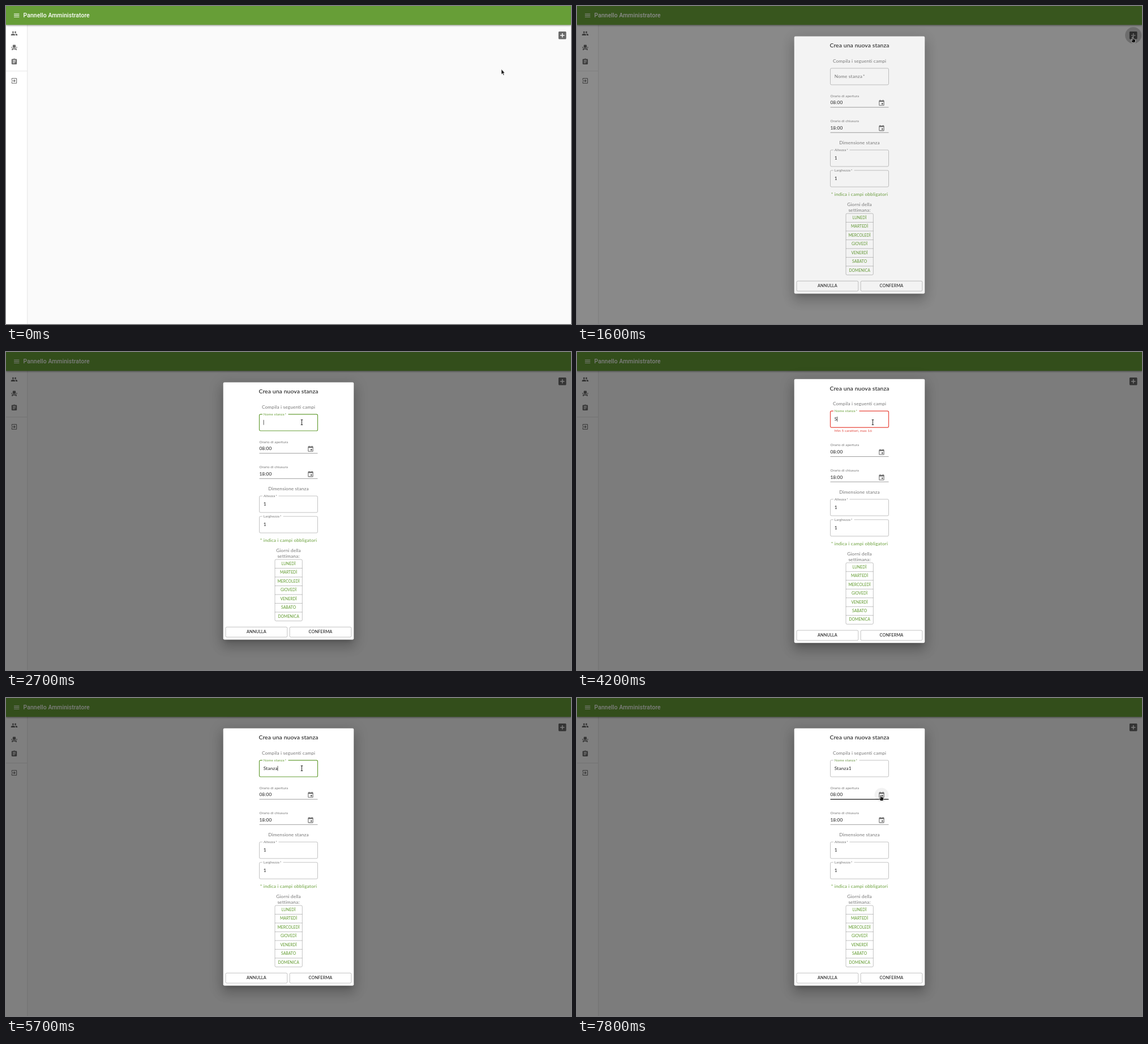
An HTML page for the animation above (8 s loop, 998x561 px).

```html
<!DOCTYPE html>
<html lang="it">
<head>
<meta charset="utf-8">
<title>Pannello Amministratore</title>
<style>
html, body { margin: 0; width: 100%; height: 100%; overflow: hidden; background: #fafafa; }
svg { display: block; width: 998px; height: 561px; }
text { font-family: Lato, "Open Sans", sans-serif; white-space: pre; }
.body { font-size: 8.32px; letter-spacing: .15px; }
.small { font-size: 6.24px; letter-spacing: .11px; }
.mid { text-anchor: middle; }
.grey { fill: #757575; }
.ink { fill: #212121; }
.green { fill: #689f38; }
.line { fill: none; stroke: rgba(0,0,0,.3); stroke-width: .8; }
.icon { fill: rgba(0,0,0,.58); }
</style>
</head>
<body>
<svg id="stage" viewBox="0 0 998 561" xmlns="http://www.w3.org/2000/svg"></svg>
<script>
const ICONS = {
  menu: 'M3 18h18v-2H3v2zm0-5h18v-2H3v2zm0-7v2h18V6H3z',
  group: 'M16 11c1.66 0 2.99-1.34 2.99-3S17.66 5 16 5c-1.66 0-3 1.34-3 3s1.34 3 3 3zm-8 0c1.66 0 2.99-1.34 2.99-3S9.66 5 8 5C6.34 5 5 6.34 5 8s1.34 3 3 3zm0 2c-2.33 0-7 1.17-7 3.5V19h14v-2.5c0-2.33-4.67-3.5-7-3.5zm8 0c-.29 0-.62.02-.97.05 1.16.84 1.97 1.97 1.97 3.45V19h6v-2.5c0-2.33-4.67-3.5-7-3.5z',
  seat: 'M4 18v3h3v-3h10v3h3v-6H4zm15-8h3v3h-3zM2 10h3v3H2zm15 3H7V5c0-1.1.9-2 2-2h6c1.1 0 2 .9 2 2v8z',
  tasks: 'M19 3h-4.18C14.4 1.84 13.3 1 12 1c-1.3 0-2.4.84-2.82 2H5c-1.1 0-2 .9-2 2v14c0 1.1.9 2 2 2h14c1.1 0 2-.9 2-2V5c0-1.1-.9-2-2-2zm-7 0c.55 0 1 .45 1 1s-.45 1-1 1-1-.45-1-1 .45-1 1-1zm2 14H7v-2h7v2zm3-4H7v-2h10v2zm0-4H7V7h10v2z',
  exit: 'M10.09 15.59L11.5 17l5-5-5-5-1.41 1.41L12.67 11H3v2h9.67l-2.58 2.59zM19 3H5c-1.11 0-2 .9-2 2v4h2V5h14v14H5v-4H3v4c0 1.1.89 2 2 2h14c1.1 0 2-.9 2-2V5c0-1.1-.9-2-2-2z',
  add: 'M19 3H5c-1.11 0-2 .9-2 2v14c0 1.1.89 2 2 2h14c1.1 0 2-.9 2-2V5c0-1.1-.9-2-2-2zm-2 10h-4v4h-2v-4H7v-2h4V7h2v4h4v2z',
  event: 'M17 12h-5v5h5v-5zM16 1v2H8V1H6v2H5c-1.11 0-1.99.9-1.99 2L3 19c0 1.1.89 2 2 2h14c1.1 0 2-.9 2-2V5c0-1.1-.9-2-2-2h-1V1h-2zm3 18H5V8h14v11z'
};

const ADD = { x: 982.7, y: 51.7, r: 14.6 };
const DATE = { x: 538, y: 171.1, r: 12.5 };
const DIALOG = { x: 383.7, y: 53.6, w: 230.6, h: 453.8 };
const GROW = 5.8;
const GREY = [117, 117, 117], GREEN = [104, 159, 56], RED = [244, 67, 54];

// Markup helpers
const icon = (name, cx, cy, size = 12.48, cls = 'icon') =>
  `<path class="${cls}" d="${ICONS[name]}" transform="translate(${cx - size / 2} ${cy - size / 2}) scale(${size / 24})"/>`;
const text = (x, y, cls, str, more = '') => `<text x="${x}" y="${y}" class="${cls}" ${more}>${str}</text>`;
const shadow = (b, dy, blur, spread, alpha) =>
  `<rect x="${b.x - spread}" y="${b.y - spread + dy}" width="${b.w + 2 * spread}" height="${b.h + 2 * spread}" opacity="${alpha}" style="filter:blur(${blur}px)"/>`;
const star = '<tspan dx=".13em">*</tspan>';
const outline = (y, from, to) =>
  `M${to} ${y}H548.4a2.1 2.1 0 0 1 2.1 2.1v24.9a2.1 2.1 0 0 1-2.1 2.1H449.6a2.1 2.1 0 0 1-2.1-2.1v-24.9a2.1 2.1 0 0 1 2.1-2.1H${from}`;
const numberField = (y, label, notch) =>
  `<path class="line" d="${outline(y, 453, notch)}"/>` +
  text(454.8, y + 2.2, 'small grey', label + star) + text(454.8, y + 17.4, 'body ink', '1');
const timeField = (y, label, value, id) =>
  text(447.4, y, 'small grey', label) + text(447.4, y + 12.5, 'body ink', value) +
  `<path id="${id}" d="M447.5 ${y + 18}h103" stroke="#000"/>` + icon('event', DATE.x, y + 10.4);
const button = (x, label) =>
  `<rect class="line" x="${x}" y="485.2" width="108.8" height="17.8" rx="2.1"/>` +
  text(x + 54.4, 496.2, 'mid ink', label, 'font-size="7.28" font-weight="500" letter-spacing=".14"');

const days = ['LUNEDÌ', 'MARTEDÌ', 'MERCOLEDÌ', 'GIOVEDÌ', 'VENERDÌ', 'SABATO', 'DOMENICA'];
const dayRow = (day, i) => {
  const y = 366 + 15.48 * i;
  return (i ? `<path class="line" d="M475 ${y}h48.3"/>` : '') +
    text(499.1, y + 9.8, 'mid green', day, 'font-size="6.76" font-weight="500" letter-spacing=".06"');
};

const bar = { x: 0, y: 0, w: 998, h: 33.3 };
document.getElementById('stage').innerHTML = `
<rect width="998" height="561" fill="#fafafa"/>
<rect width="37.5" height="561" fill="#fff"/>
<path d="M37.7 0V561M0 114.8H37.5" stroke="#dcdcdc" stroke-width=".7"/>
${icon('group', 14.5, 48.3)}${icon('seat', 14.5, 73.3)}${icon('tasks', 14.5, 98.2)}${icon('exit', 14.5, 132)}
${shadow(bar, 1, 1, -.5, .2)}${shadow(bar, 2, 1.3, 0, .14)}${shadow(bar, .5, 2.6, 0, .12)}
<rect width="998" height="33.3" fill="#679e37"/>
${icon('menu', 18.7, 16.6, 12.48, '" fill="#fff')}
<text x="30.6" y="20.2" fill="#fff" style="font:500 10.4px Roboto,sans-serif;letter-spacing:.078px">Pannello Amministratore</text>
${icon('add', ADD.x, ADD.y, 18.2)}
<circle id="addHover" cx="${ADD.x}" cy="${ADD.y}" r="${ADD.r}"/>
<circle id="addRipple" cx="${ADD.x}" cy="${ADD.y}"/>
<rect id="backdrop" width="998" height="561"/>
<g id="dialog">
  <g id="shade">${shadow(DIALOG, 5.7, 3.9, -3.6, .2)}${shadow(DIALOG, 12.5, 9.9, 1.6, .14)}${shadow(DIALOG, 4.7, 12, 4.2, .12)}</g>
  <rect id="paper" x="${DIALOG.x}" width="${DIALOG.w}" rx="2.1" fill="#fff"/>
  <g id="upper">
    ${text(499, 73.4, 'mid ink', 'Crea una nuova stanza', 'font-size="10.4" font-weight="500" letter-spacing=".11"')}
    ${text(499, 100, 'mid body grey', 'Compila i seguenti campi')}
    <path id="nameBox" fill="none"/>
    <text id="nameLabel" class="body">Nome stanza${star}</text>
    ${text(454.8, 127.1, 'body ink', '', 'id="nameValue"')}
    <path id="caret" stroke="#111" stroke-width=".7"/>
    ${text(454.8, 147.3, 'small', 'Min 5 caratteri, max 16', 'id="hint" fill="#e0443a"')}
  </g>
  <g id="lower">
    ${timeField(160.7, 'Orario di apertura', '08:00', 'openLine')}
    ${timeField(205.3, 'Orario di chiusura', '18:00', 'closeLine')}
    <circle id="dateHover" cx="${DATE.x}" cy="${DATE.y}" r="${DATE.r}"/>
    ${text(499, 244.2, 'mid body grey', 'Dimensione stanza')}
    ${numberField(254, 'Altezza', 481.5)}
    ${numberField(290, 'Larghezza', 489.5)}
    ${text(499, 335.2, 'mid body green', '* indica i campi obbligatori')}
    ${text(499, 353, 'mid body grey', 'Giorni della')}
    ${text(499, 363.3, 'mid body grey', 'settimana:')}
    <rect class="line" x="475" y="366" width="48.3" height="108.4" rx="2.1"/>
    ${days.map(dayRow).join('')}
    ${button(388, 'ANNULLA')}${button(501.1, 'CONFERMA')}
  </g>
</g>
<g id="cursor" fill="#151515" stroke="#fff" stroke-width=".6" stroke-linejoin="round">
  <path id="arrow" d="M0 0V9.2L2.1 7.3L3.6 10.8L5.1 10.1L3.6 6.7H6.2Z"/>
  <path id="hand" d="M-.8 .6Q0-.5 .8 .6V3.6L2.3 3.8L3.9 4.2L5 5V7.6L4.1 10.3H-.6L-2.7 6.9Q-3-.4+5.4-1.8 5.6L-.8 6.5Z"/>
  <g id="beam"><path d="M-1.8-4.4H1.8M0-4.4V4.4M-1.8 4.4H1.8" stroke-width="1.7"/><path d="M-1.8-4.4H1.8M0-4.4V4.4M-1.8 4.4H1.8" stroke="#151515" stroke-width=".9"/></g>
</g>`;

const el = {};
document.querySelectorAll('[id]').forEach(n => el[n.id] = n);
el.hand.setAttribute('d', 'M-.8 .6Q0-.5 .8 .6V3.6L2.3 3.8L3.9 4.2L5 5V7.6L4.1 10.3H-.6L-2.7 6.9Q-2.8 5.4-1.8 5.6L-.8 6.5Z');
const set = (node, attrs) => { for (const k in attrs) node.setAttribute(k, attrs[k]); };
const show = (node, on) => node.setAttribute('visibility', on ? 'visible' : 'hidden');

// Timing helpers
const clamp = v => Math.max(0, Math.min(1, v));
const lerp = (a, b, p) => a + (b - a) * p;
const bezier = (x1, y1, x2, y2) => x => {
  if (x <= 0 || x >= 1) return clamp(x);
  const at = (a, b, u) => 3 * a * u * (1 - u) ** 2 + 3 * b * u * u * (1 - u) + u ** 3;
  let lo = 0, hi = 1;
  for (let i = 0; i < 24; i++) {
    const u = (lo + hi) / 2;
    if (at(x1, x2, u) < x) lo = u; else hi = u;
  }
  return at(y1, y2, lo);
};
const standard = bezier(.4, 0, .2, 1), easeOut = bezier(0, 0, .2, 1);
const span = (t, start, length, ease = standard) => ease(clamp((t - start) / length));
const within = (t, ...ranges) => ranges.some(([a, b]) => t >= a && t < b);
const near = (p, c) => Math.hypot(p.x - c.x, p.y - c.y) < c.r;

const PATH = [[400, 875, 111.5], [1300, 981.5, 54.5], [1650, 981.5, 54.5], [1900, 640, 141],
  [2000, 640, 141], [2400, 522.5, 124], [6600, 522.5, 124], [7500, 536.5, 171]];
const KEYS = [4200, 4900, 5000, 5100, 5300, 5500, 6500];

function pointer(t) {
  let i = PATH.findIndex(k => t < k[0]);
  if (i < 0) i = PATH.length;
  const a = PATH[Math.max(0, i - 1)], b = PATH[Math.min(i, PATH.length - 1)];
  const u = b[0] > a[0] ? clamp((t - a[0]) / (b[0] - a[0])) : 0, p = u * u * (3 - 2 * u);
  return { x: lerp(a[1], b[1], p), y: lerp(a[2], b[2], p) };
}

function labelColor(t) {
  let c = GREY;
  for (const [start, to] of [[2450, GREEN], [4200, RED], [5300, GREEN], [7750, GREY]])
    c = c.map((v, i) => lerp(v, to[i], span(t, start, 200)));
  return `rgb(${c.map(Math.round)})`;
}

function draw(t) {
  const p = pointer(t);
  const fade = span(t, 1455, 225);
  const error = within(t, [4200, 5300]);
  const focus = within(t, [2450, 7750]);
  const grow = error ? GROW : 0;
  const overName = t > 2000 && p.x > 447 && p.x < 551 && p.y > 109 && p.y < 139;
  const overDate = t > 6700 && p.y > 163 && p.y < 179;
  const onAdd = t < 1650 && near(p, ADD), onDate = near(p, DATE);

  // Add button
  set(el.addHover, { opacity: onAdd ? .04 : 0 });
  set(el.addRipple, {
    r: ADD.r * span(t, 1370, 260, easeOut),
    opacity: .17 * (1 - span(t, 1620, 260)) * (t >= 1400)
  });

  // Dialog
  set(el.backdrop, { opacity: .5 * fade });
  set(el.dialog, { opacity: fade });
  set(el.paper, { y: DIALOG.y - grow, height: DIALOG.h + 2 * grow });
  const mid = DIALOG.y + DIALOG.h / 2, k = 1 + 2 * grow / DIALOG.h;
  set(el.shade, { transform: `translate(0 ${mid * (1 - k)}) scale(1 ${k})` });
  set(el.upper, { transform: `translate(0 ${-grow})` });
  set(el.lower, { transform: `translate(0 ${grow})` });

  // Name field
  const lift = span(t, 2450, 200, easeOut);
  set(el.nameLabel, {
    transform: `translate(454.8 ${lerp(127.1, 111.9, lift)}) scale(${lerp(1, .75, lift)})`,
    fill: labelColor(t)
  });
  set(el.nameBox, {
    d: outline(109.9, 453, lerp(453, 498.5, lift)),
    stroke: error ? '#e8453a' : focus ? '#689f38' : overName ? '#333' : 'rgba(0,0,0,.3)',
    'stroke-width': focus ? 1.2 : .8
  });
  el.nameValue.textContent = 'Stanza1'.slice(0, KEYS.filter(k => t >= k).length);
  const end = 455.1 + (el.nameValue.textContent ? el.nameValue.getComputedTextLength() : 0);
  set(el.caret, { d: `M${end} 119.8v8.8` });
  show(el.caret, within(t, [2500, 3700], [4200, 6200], [6500, 7000], [7500, 7750]));
  show(el.hint, error);

  // Time fields
  const rest = { 'stroke-width': .8, 'stroke-opacity': .48 };
  set(el.openLine, overDate ? { 'stroke-width': 1.2, 'stroke-opacity': .9 } : rest);
  set(el.closeLine, rest);
  set(el.dateHover, { opacity: onDate ? .05 : 0 });

  // Pointer
  const shape = onAdd || onDate || (t < 1700 && near(p, ADD)) ? 'hand' : overName || overDate ? 'beam' : 'arrow';
  for (const s of ['arrow', 'hand', 'beam']) show(el[s], s === shape);
  set(el.cursor, { transform: `translate(${p.x} ${p.y})` });
}

function tick() {
  const t = performance.now() % 8000;
  draw(Math.min(7800, Math.floor(t / 100) * 100));
  requestAnimationFrame(tick);
}
tick();
</script>
</body>
</html>
```
